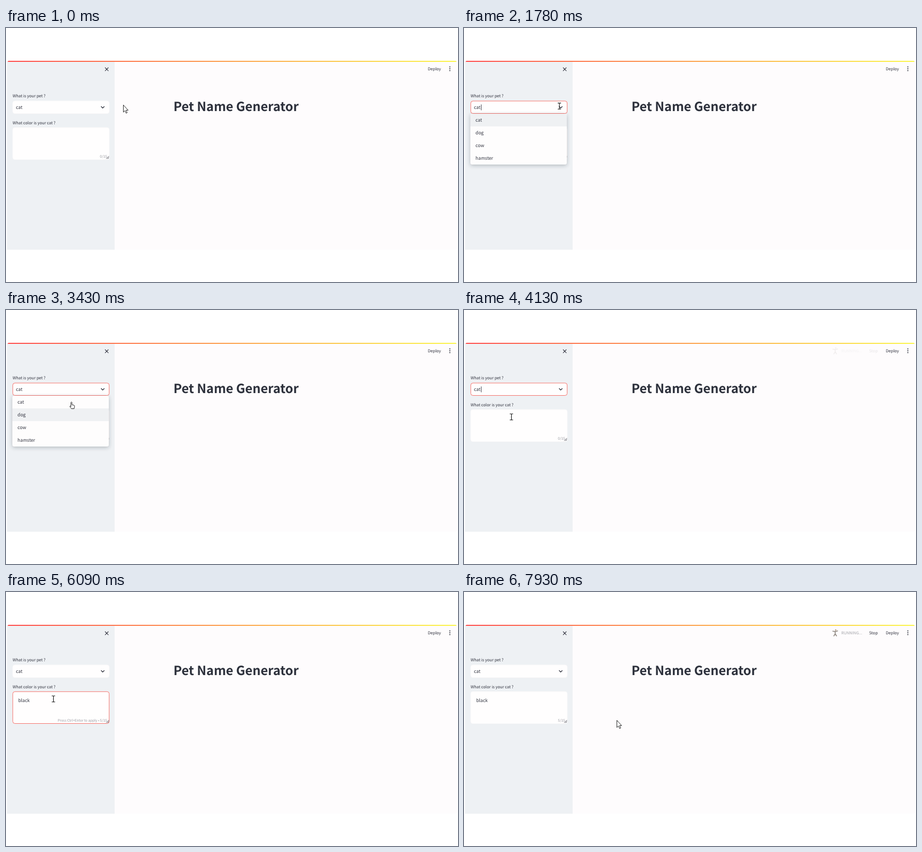
An HTML page for the animation above (8000 ms loop, 853 by 480 pixels).

```html
<!DOCTYPE html>
<html lang="en">
<head>
<meta charset="utf-8">
<title>Pet Name Generator</title>
<style>
  html, body { margin: 0; width: 100%; height: 100%; overflow: hidden; background: #fff; }
  svg { display: block; width: 100%; height: 100%; }
  text {
    font-family: "Noto Sans CJK JP", "Noto Sans CJK SC", "Noto Sans CJK", "Noto Sans", sans-serif;
    font-size: 8.65px; fill: #31333f; text-rendering: geometricPrecision; white-space: pre;
  }
  .small { font-size: 7.6px; }
  .hint { font-size: 6.5px; fill: #97989f; text-anchor: end; }
  .title { font-size: 23.8px; font-weight: 700; fill: #2c303b; }
  .line { fill: none; stroke: #31333f; stroke-linecap: round; stroke-linejoin: round; }
  .field { fill: #fffefe; stroke-width: 0.9; }
</style>
</head>
<body>
<svg viewBox="0 0 853 480">
  <defs>
    <linearGradient id="bar">
      <stop offset="0" stop-color="#ff4b4b"/>
      <stop offset="1" stop-color="#fbf64a"/>
    </linearGradient>
    <filter id="shade" x="-20%" y="-20%" width="140%" height="150%">
      <feDropShadow dx="0" dy="2" stdDeviation="3.5" flood-color="#30343c" flood-opacity="0.3"/>
    </filter>
  </defs>

  <rect x="2" y="62" width="849" height="357" rx="4" fill="#fefcfd"/>
  <path d="M6 62H205V419H2V66Q2 62 6 62Z" fill="#eef1f4"/>
  <path d="M5 62H848Q850 62 850.5 64H3Q3.500 62 5 62Z" fill="url(#bar)"/>

  <path class="line" d="M187.200 75L193 80.800M193 75L187.200 80.800" stroke-width="1.100"/>
  <text class="small" x="796" y="79.600">Deploy</text>
  <g fill="#31333f">
    <circle cx="837.600" cy="73.500" r="1.100"/>
    <circle cx="837.600" cy="77" r="1.100"/>
    <circle cx="837.600" cy="80.500" r="1.100"/>
  </g>
  <g id="status">
    <g class="line" style="stroke:#8f8780" stroke-width="1.600">
      <circle cx="701.500" cy="71.700" r="1.300" fill="#b69a80" stroke="none"/>
      <path id="runner"/>
    </g>
    <text x="712" y="79.600" style="font-size:7.4px;fill:#a3a4aa">RUNNING...</text>
    <text class="small" x="764.500" y="79.600">Stop</text>
  </g>

  <text class="title" x="316" y="157.300">Pet Name Generator</text>

  <text class="small" x="12.500" y="131">What is your pet ?</text>
  <rect id="select" class="field" x="12.800" y="138" width="181.900" height="23.500" rx="4"/>
  <text x="18.800" y="153">cat</text>
  <path class="line" d="M179.700 148.500L182.500 151.300L185.300 148.500" stroke-width="1.300"/>
  <path id="selectCaret" d="M32.500 144.500V155.500" stroke="#31333f" stroke-width="0.900"/>

  <text class="small" x="12.500" y="182">What color is your cat ?</text>
  <rect id="area" class="field" x="12.800" y="188.300" width="181.900" height="60.200" rx="4"/>
  <text id="typed" x="23" y="208"></text>
  <path id="areaCaret" stroke="#31333f" stroke-width="0.900"/>
  <text id="hint" class="hint" x="190.700" y="245"></text>
  <path class="line" d="M189.500 247L194 242.500M192 247L194 245" stroke-width="0.900"/>

  <g id="menu">
    <rect x="12" y="162" width="182" height="96" rx="4" fill="#fefdfd" filter="url(#shade)"/>
    <rect id="hover" x="12" width="182" height="24" fill="#eff1f3"/>
  </g>

  <g id="pointer">
    <path id="arrow" d="M0 0V13.500L3 10.700L5.200 15.500L7.300 14.500L5.100 9.900H9Z"
          fill="#fff" stroke="#111" stroke-width="0.900"/>
    <path id="beam" class="line" style="stroke:#111" stroke-width="1.100"
          d="M-2.700 -5.700H-1Q0 -5.700 0 -4.700Q0 -5.700 1 -5.700H2.700M0 -4.700V4.700M-2.700 5.700H-1Q0 5.700 0 4.700Q0 5.700 1 5.700H2.700"/>
    <path id="hand" fill="#fff" stroke="#111" stroke-width="0.900" stroke-linejoin="round"
          d="M-1 9V1Q0 -1 1 1V5.500L5 6.500Q6 7 5.800 9L5 13H0L-3.200 8.800Q-3 7 -1 9Z"/>
  </g>
</svg>
<script>
const LOOP = 8000;
const OPEN = 1510, PICK = 3620, FOCUS = 4600, KEYS = 4850, KEY_GAP = 160, BLUR = 7560;
const WORD = "black";
const OPTIONS = ["cat", "dog", "cow", "hamster"];
const MENU_TOP = 162, ROW = 24;

// time, x, y
const PATH = [
  [0, 221.5, 145.5], [130, 221.5, 145.5], [600, 182, 150], [1500, 182, 150],
  [1800, 180, 147.5], [2750, 180, 147.5], [3150, 124, 198], [3340, 122, 194],
  [3430, 123.5, 173.5], [3650, 123, 174], [4080, 89.5, 202], [6700, 89.5, 202],
  [7400, 288.5, 242.5], [LOOP, 288.5, 242.5]
];

const $ = id => document.getElementById(id);
const clamp = v => Math.max(0, Math.min(1, v));
const ramp = (t, from, to) => clamp((t - from) / (to - from));
const ease = p => p * p * (3 - 2 * p);
const show = (id, on) => { $(id).style.display = on ? "" : "none"; };
const blink = (t, start) => t >= start && (t - start) % 1060 < 530;

OPTIONS.forEach((name, i) => {
  const label = document.createElementNS("http://www.w3.org/2000/svg", "text");
  label.setAttribute("x", 21.8);
  label.setAttribute("y", MENU_TOP + ROW * i + 15);
  label.textContent = name;
  $("menu").append(label);
});

function pointerAt(t) {
  const i = Math.max(1, PATH.findIndex(k => k[0] > t));
  const [t0, x0, y0] = PATH[i - 1], [t1, x1, y1] = PATH[i];
  const p = ease(ramp(t, t0, t1));
  return [x0 + (x1 - x0) * p, y0 + (y1 - y0) * p];
}

function drawPointer(t, open) {
  const [x, y] = pointerAt(t);
  const inside = x > 13 && x < 195;
  const onField = inside && (y > 138 && y < 162 || y > 188 && y < 249);
  const kind = open && inside && y > MENU_TOP ? "hand" : onField ? "beam" : "arrow";
  for (const id of ["arrow", "beam", "hand"]) show(id, id === kind);
  $("pointer").setAttribute("transform", `translate(${x} ${y})`);
}

function drawStatus(t) {
  const first = ramp(t, 3680, 3800) * (1 - ramp(t, 3940, 4155));
  $("status").style.opacity = first + ramp(t, 7600, 7760);
  const stride = Math.floor(t / 180) % 2;
  $("runner").setAttribute("d", stride
    ? "M701 74L699.500 78L702 80L701.500 83M699.500 78L697 80L695.500 82M697 76L700.500 74.500L704 77"
    : "M700.500 74V79L698 83M700.500 79L703 83M696 74L700.500 75L705 73.500");
}

function render(t) {
  const open = t >= OPEN && t < PICK;
  const selectOn = t >= OPEN && t < FOCUS;
  const areaOn = t >= FOCUS && t < BLUR;
  const border = on => on ? "#f5675f" : "#fdfbfb";

  $("select").style.stroke = border(selectOn);
  show("selectCaret", selectOn && blink(t, OPEN));

  show("menu", open);
  const row = Math.floor((pointerAt(t - 90 < 0 ? 0 : t - 90)[1] - MENU_TOP) / ROW);
  $("hover").setAttribute("y", MENU_TOP + ROW * Math.max(0, Math.min(3, row)));

  const count = Math.max(0, Math.min(WORD.length, Math.floor((t - KEYS) / KEY_GAP) + 1));
  const lastKey = count ? KEYS + (count - 1) * KEY_GAP : FOCUS;
  $("area").style.stroke = border(areaOn);
  $("typed").textContent = WORD.slice(0, count);
  $("hint").textContent = (areaOn && count ? "Press Ctrl+Enter to apply • " : "") + count + "/15";
  const end = 23.4 + (count ? $("typed").getComputedTextLength() : 0);
  $("areaCaret").setAttribute("d", `M${end} 199.500V210`);
  show("areaCaret", areaOn && blink(t, lastKey));

  drawStatus(t);
  drawPointer(t, open);
}

const start = performance.now();
function tick() {
  render((performance.now() - start) % LOOP);
  requestAnimationFrame(tick);
}
tick();
</script>
</body>
</html>
```
